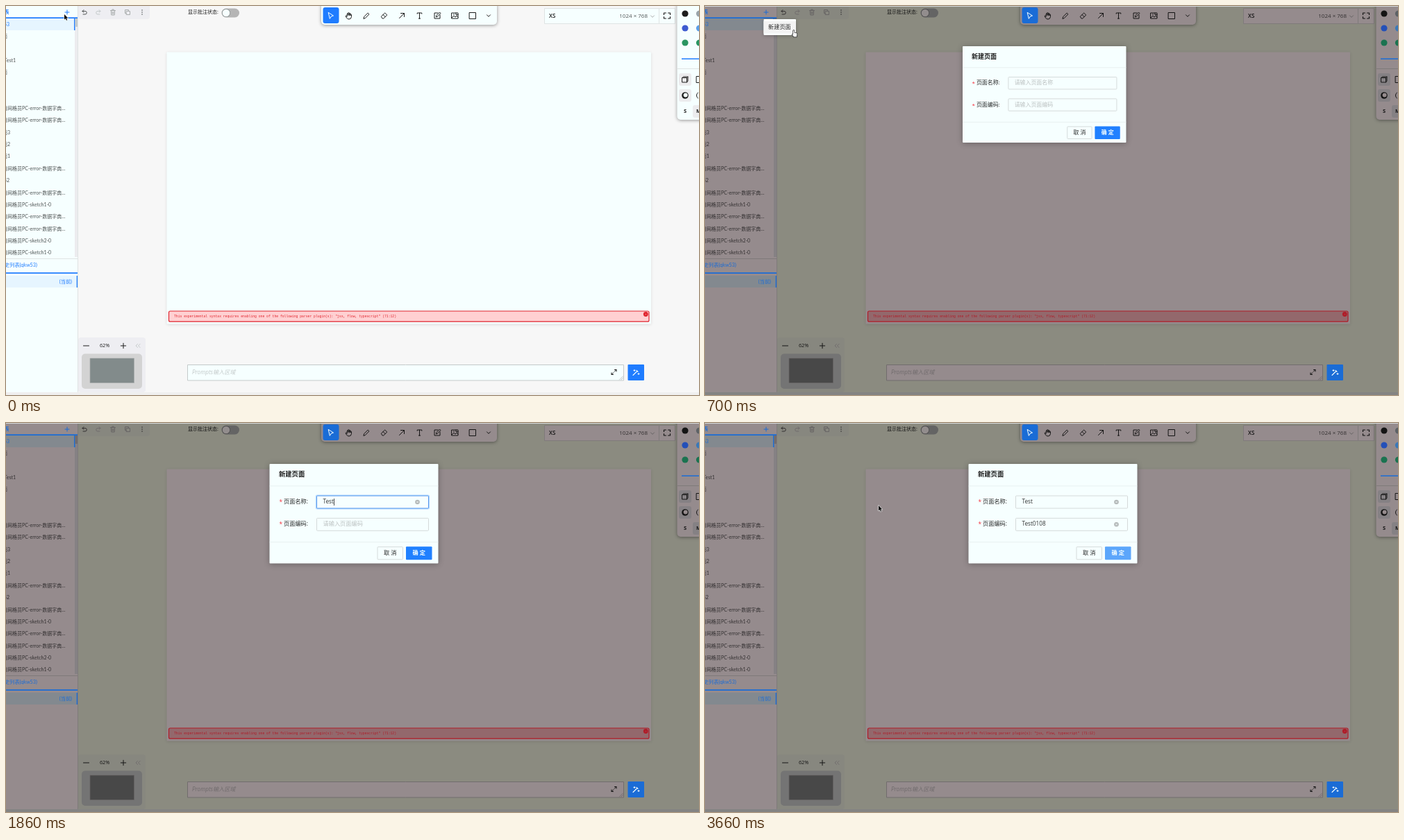
An HTML page with a canvas for the animation above (3680 ms loop, 998 by 561 pixels).

```html
<!DOCTYPE html>
<html lang="zh">
<head>
<meta charset="utf-8">
<style>
  html, body { margin: 0; width: 100%; height: 100%; overflow: hidden; }
  canvas { display: block; width: 998px; height: 561px; }
</style>
</head>
<body>
<canvas id="stage" width="998" height="561"></canvas>
<script>
const ctx = document.getElementById('stage').getContext('2d');
const LOOP = 3680, STEP = 20;
const SANS = '"Open Sans", "Noto Sans CJK SC", "Noto Sans CJK", sans-serif';
const LIST = 'Lato, "Noto Sans CJK SC", "Noto Sans CJK", sans-serif';
const MONO = '"Liberation Mono", monospace';

// Each colour: open page, mask fading in, full mask
const COLORS = {
  panel: ['#f6ffff', '#dcdcdc', '#958b8d'],
  bg: ['#f7f7f7', '#d6d6d6', '#8b8b80'],
  bar: ['#eeeef2', '#cdcdd1', '#87877f'],
  chip: ['#ececee', '#cbcbcd', '#858184'],
  edge: ['#dfe3e3', '#c2c2c2', '#7f7a7a'],
  blue: ['#1f7cff', '#1f66cc', '#1a6cd6'],
  row: ['#e6f5ff', '#c9d5de', '#83898f'],
  ink: ['#1c1c1c', '#1a1a1a', '#141414'],
  text: ['#505454', '#454545', '#333031'],
  muted: ['#a9adad', '#979797', '#676464'],
  faint: ['#c4caca', '#adadad', '#716c6d'],
  track: ['#b5b5b5', '#9c9c9c', '#646464'],
  knob: ['#f6ffff', '#dcdcdc', '#928d8d'],
  map: ['#d3d3d3', '#b4b4b8', '#747474'],
  view: ['#828b8b', '#707070', '#484848'],
  alert: ['#ffd0d2', '#d9b1b1', '#93686c'],
  red: ['#e0252f', '#cc2730', '#b01c28'],
  indigo: ['#3d5bd0', '#2a50c8', '#2450b8'],
  sky: ['#5b9fe8', '#4a8cd0', '#3a78b8'],
  green: ['#2a9662', '#2e7d55', '#1a7350'],
  gray: ['#9aa5ab', '#858e92', '#5c6266'],
  foot: ['#efefef', '#d4dcdc', '#838383']
};
let c = {};

function box(x, y, r, b, fill, stroke, radius = 0, width = 1) {
  ctx.beginPath();
  ctx.roundRect(x, y, r - x, b - y, radius);
  if (fill) { ctx.fillStyle = fill; ctx.fill(); }
  if (stroke) { ctx.strokeStyle = stroke; ctx.lineWidth = width; ctx.stroke(); }
}

function shadowBox(x, y, r, b, fill, radius, blur, alpha) {
  ctx.save();
  ctx.shadowColor = `rgba(0,0,0,${alpha})`;
  ctx.shadowBlur = blur;
  ctx.shadowOffsetY = 1;
  box(x, y, r, b, fill, null, radius);
  ctx.restore();
}

function dot(x, y, r, fill) {
  ctx.beginPath();
  ctx.arc(x, y, r, 0, 7);
  ctx.fillStyle = fill;
  ctx.fill();
}

function text(s, x, y, size, color, { font = SANS, style = '', align = 'left' } = {}) {
  ctx.font = `${style} ${size}px ${font}`;
  ctx.textAlign = align;
  ctx.textBaseline = 'middle';
  ctx.fillStyle = color;
  ctx.fillText(s, x, y);
}

function icon(d, x, y, stroke, fill, width = 1) {
  const path = new Path2D(d);
  ctx.save();
  ctx.translate(x, y);
  ctx.lineJoin = ctx.lineCap = 'round';
  if (stroke) { ctx.strokeStyle = stroke; ctx.lineWidth = width; ctx.stroke(path); }
  if (fill) { ctx.fillStyle = fill; ctx.fill(path); }
  ctx.restore();
}

const PLUS = 'M-3 0H3M0-3V3';
const SQUARE = 'M-4.5-4.5H4.5V4.5H-4.5Z';
const CHEVRON = 'M-2.5-1.2L0 1.3L2.5-1.2';
const UNDO = 'M-1-3.5L-3-1.5L-1 .5M-3-1.5H1A2.2 2.2 0 0 1 1 3H-2';
const REDO = 'M1-3.5L3-1.5L1 .5M3-1.5H-1A2.2 2.2 0 0 0-1 3H2';
const TRASH = 'M-3.5-2.5H3.5M-1.2-2.5V-4H1.2V-2.5M-2.6-2.5L-2.2 4H2.2L2.6-2.5M-.8-.5V2.3M.8-.5V2.3';
const COPY = 'M-1.5-1.5H3.5V3.5H-1.5ZM-1.5 1.5H-3.5V-3.5H1.5V-1.5';
const POINTER = 'M-3-4.5L4 0L.8 1L-1 4Z';
const PALM = 'M-2.5 1V-2.5Q-1.7-4-1-2.5V-.5V-4Q0-5 .7-4V-.5V-3.5Q1.6-4.5 2.3-3V0V-2Q3.5-3 4 -1.5V1.5Q3.5 5 .5 5Q-2 5-3 3L-4.5 .6Q-4-.8-2.5 1';
const PENCIL = 'M-4 4L-3.3 1.5L2.2-4L4-2.2L-1.5 3.3Z';
const ERASER = 'M-4 1L1.2-4L4.3-1L-.8 4H-2ZM-1.5-1.5L1.7 1.7';
const ARROW = 'M-3.5 3.5L3.5-3.5M-1.5-3.5H3.5V1.5';
const LETTER = 'M-3.3-2.8V-4H3.3V-2.8M0-4V4M-1.2 4H1.2';
const EDIT = 'M1-4H-4V4H4V-1M-1.5 1.5L-1-.5L3.5-5L5-3.5L.5 1Z';
const IMAGE = 'M-4.5-4H4.5V4H-4.5ZM-4.5 3L-1.5 0L.5 2L2.5 0L4.5 2M-2-2H-1M1.5-4V-1.5H4.5';
const CORNERS = 'M-4.5-1.5V-4H-1.5M1.5-4H4.5V-1.5M4.5 1.5V4H1.5M-1.5 4H-4.5V1.5';
const EXPAND = 'M.8-.8L3.5-3.5M1-3.5H3.5V-1M-.8 .8L-3.5 3.5M-3.5 1V3.5H-1';
const WAND = 'M-4 4L2-2M1-3L3-1M-2-4V-2M-3-3H-1M4 1V3M3 2H5';

function drawSidebar() {
  box(0, 0, 103, 557, c.panel);
  box(99, 18, 103, 362, c.chip);
  box(0, 18, 98, 35, c.row);
  box(98, 18, 99.5, 35, c.blue);
  box(99.5, 18, 103, 30, c.faint);
  box(0, 16.3, 103, 18, c.blue);
  text('表', 4.5, 9, 7.2, c.blue, { font: LIST, align: 'right', style: 'bold' });
  icon(PLUS, 88, 9, c.blue);

  const error = '目网格员PC-error-数据字典…', sketch = '目网格员PC-sketch';
  const rows = ['qkw53', '面', '', 'Test1', '面', '', '', error, error, '面3', '面2', '面1',
    error, 'qkw52', error, sketch + '1-0', error, error, sketch + '2-0', sketch + '1-0'];
  rows.forEach((label, i) => {
    const y = 26.5 + 17.35 * i;
    if (label.startsWith('qkw')) text(label, 5, y, 7, i ? c.text : c.blue, { font: LIST, align: 'right' });
    else if (label === 'Test1') text(label, 14, y, 7, c.text, { font: LIST, align: 'right' });
    else text(label, -4.9, y, 7, c.text, { font: LIST });
  });

  box(0, 362, 103, 389, c.panel);
  box(0, 364, 103, 365, c.edge);
  text('史列表(qkw53)', -2, 374, 7.2, c.blue, { font: LIST });
  box(0, 384.2, 103, 386, c.blue);
  box(0, 389, 103, 406, c.row);
  box(101.7, 389, 103, 406, c.blue);
  text('(当前)', 95, 398, 7.2, c.blue, { font: LIST, align: 'right' });
  box(103, 0, 104, 557, c.edge);
}

function drawToolbars() {
  box(104, -5, 207, 19, c.bar, null, 4);
  icon(UNDO, 113, 9, c.text);
  icon(REDO, 133, 9, c.faint);
  icon(TRASH, 154, 9, c.muted);
  icon(COPY, 175, 9, c.muted);
  for (const y of [6, 9, 12]) dot(196, y, 0.8, c.text);
  text('显示批注状态:', 262, 9.5, 7, c.ink);
  box(310.5, 3.5, 336, 16.5, c.track, null, 6.5);
  dot(317, 10, 6, c.view);
  dot(317, 10, 5.3, c.knob);

  shadowBox(454, -5, 707, 27, c.panel, 5, 5, 0.4);
  box(456.5, 2, 479.5, 25, c.blue, null, 3);
  icon(POINTER, 467.5, 14, '#f6ffff');
  [PALM, PENCIL, ERASER, ARROW, LETTER, EDIT, IMAGE, SQUARE, CHEVRON].forEach((d, i) =>
    icon(d, i < 8 ? 493.5 + 25.5 * i : 695, 14, c.ink));

  box(775.5, 3.5, 940.5, 25.5, c.panel, c.edge);
  text('XS', 782, 15, 8, c.ink, { style: '600' });
  text('1024 × 768', 924, 15, 8, c.text, { align: 'right' });
  icon(CHEVRON, 931, 15, c.muted);
  box(940.5, 3.5, 963.5, 25.5, c.panel, c.edge);
  icon(CORNERS, 952, 14, c.ink, null, 1.2);
}

function drawStylePanel() {
  shadowBox(966.5, -6, 1010, 164, c.panel, 5, 5, 0.4);
  [[c.ink, c.gray], [c.indigo, c.sky], [c.green, c.green]].forEach(([left, right], i) => {
    dot(978, 11 + 21 * i, 4.6, left);
    dot(998.5, 11 + 21 * i, 4.6, right);
  });
  box(973, 75.5, 998, 77, c.blue);
  box(967, 90, 998, 91, c.edge);
  box(969, 97, 987, 115, c.chip, null, 3);
  icon('M-4-2.5H2.5V4H-4ZM-4-2.5L-2.5-4H4V2.5L2.5 4M2.5-2.5L4-4', 978, 106, c.ink);
  icon(SQUARE, 999, 106, c.ink);
  box(969, 120, 987, 138, c.chip, null, 3);
  dot(978, 129, 4.8, c.ink);
  dot(978.6, 128.4, 3, c.panel);
  icon('M-2.5-4Q-4.5-3-4.5 0Q-4.5 3-2.5 4', 999, 129, c.ink);
  text('S', 978, 152, 7.5, c.ink, { style: 'bold', align: 'center' });
  box(989, 143, 1007, 161, c.chip, null, 3);
  text('M', 994, 152, 7.5, c.ink, { style: 'bold' });
}

function drawWorkspace() {
  shadowBox(231.5, 66.5, 929, 458.5, c.panel, 1, 4, 0.12);
  box(234.5, 440, 926, 455.2, c.alert, c.red, 2, 1.2);
  text('This experimental syntax requires enabling one of the following parser plugin(s): ' +
    '"jsx, flow, typescript" (71:12)', 242, 447.5, 4.73, c.red, { font: MONO });
  dot(921.3, 444.5, 3.4, c.red);
  text('×', 921.3, 444.5, 4, c.alert, { align: 'center' });

  box(104, 478, 201, 557, c.bar, null, 4);
  icon('M-4 0H4', 115.5, 490, c.ink);
  text('62%', 142, 490, 7.2, c.ink, { align: 'center' });
  icon('M-3.7 0H3.7M0-3.7V3.7', 169, 490, c.ink);
  icon('M-.5-2.5L-3 0L-.5 2.5M3-2.5L.5 0L3 2.5', 190, 490, c.faint);
  box(109, 501.5, 196, 552, c.map, null, 5);
  box(121, 508, 184.5, 543.5, c.view, c.muted, 0, 0.7);

  box(261.5, 517.5, 889.5, 540, c.panel, c.faint);
  text('Prompts输入区域', 268, 528.5, 8.1, c.faint, { style: 'italic' });
  icon(EXPAND, 875.5, 528, c.ink);
  icon('M-2.5 2.5L2.5-2.5M0 2.5L2.5 0', 886, 536.5, c.muted, null, 0.7);
  box(895.5, 517, 919, 540, c.blue, null, 1);
  icon(WAND, 907, 528.5, '#f6ffff', null, 1.1);
  box(0, 557, 998, 561, c.foot);
}

function drawPopup(t, hovered) {
  const alpha = Math.min((t - 260) / 60, (840 - t) / 100, 1);
  if (alpha <= 0) return;
  ctx.save();
  ctx.globalAlpha = alpha;
  shadowBox(84.5, 19, 131, 42, '#fbffff', 1, 5, 0.25);
  if (hovered) box(84.5, 22, 131, 39.5, '#f3f3f3');
  text('新建页面', 91, 31, 8.2, '#2a2a2a');
  ctx.restore();
}

function drawField(label, hint, y, value, focused, hovered) {
  text('*', 393.5, y + 1, 8.2, '#f5333f');
  text(label + ':', 400, y, 8.2, '#2a2a2a');
  if (focused) box(446.5, y - 9.8, 609.3, y + 9.8, null, '#b9dcff', 1.5, 1.6);
  box(447.5, y - 9, 608.5, y + 9, '#f6ffff', focused || hovered ? '#5596ec' : '#d5dada', 1);
  text(value || hint, 456.5, y, 8.2, value ? '#333' : '#bcc1c1');
  if (value) {
    dot(592.5, y, 3.3, '#b3b8b8');
    icon('M-1-1L1 1M1-1L-1 1', 592.5, y, '#f6ffff', null, 0.8);
  }
  if (focused) {
    const end = 456.8 + (value ? ctx.measureText(value).width : 0);
    box(end, y - 5, end + 0.8, y + 5, '#222');
  }
}

function typed(word, times, t) {
  return word.slice(0, times.filter(at => t >= at).length);
}

function drawDialog(t) {
  if (t < 680) return;
  const scale = t < 760 ? 1 - 0.148 * Math.exp((680 - t) / 12.8) : 1;
  ctx.save();
  ctx.globalAlpha = t < 700 ? 0.96 : 1;
  ctx.translate(106, 26);
  ctx.scale(scale, scale);
  ctx.translate(-106, -26);
  shadowBox(379.5, 59, 622.5, 202.5, t < 700 ? '#fbfbfb' : '#f6ffff', 1, 8, 0.3);
  text('新建页面', 393, 75, 9.3, '#1c1c1c', { style: '600' });
  box(379.5, 90.5, 622.5, 91.2, '#e4ecec');
  const name = typed('Test', [1340, 1480, 1620, 1780], t);
  const code = typed('Test0108', [2400, 2480, 2560, 2660, 2900, 3040, 3160, 3300], t);
  drawField('页面名称', '请输入页面名称', 114, name, t >= 1040 && t < 2220, t >= 980 && t < 3380);
  drawField('页面编码', '请输入页面编码', 146.3, code, t >= 2220 && t < 3500, false);
  box(379.5, 171.5, 622.5, 172.2, '#e4ecec');
  box(535, 178.7, 571.5, 196.8, '#f6ffff', '#d5dada', 1);
  text('取 消', 553.3, 187.8, 8.2, '#2a2a2a', { align: 'center' });
  box(576, 178.2, 613.5, 197.2, t >= 3460 ? '#5ca6fb' : '#2080ff', null, 1);
  text('确 定', 594.8, 187.8, 8.2, '#f6ffff', { align: 'center', style: '600' });
  ctx.restore();
}

const MOUSE = [[0, 84, 12], [200, 84, 12], [300, 88, 10], [400, 90, 15], [560, 106, 27], [640, 106, 28],
  [660, 114, 28], [680, 119, 33], [720, 131, 36], [980, 500, 112], [1300, 502, 115],
  [3340, 502, 115], [3470, 592, 188], [3540, 592, 188], [3660, 250, 119], [3680, 240, 118]];

function mouseAt(t) {
  const i = MOUSE.findIndex(k => k[0] > t);
  const [t0, x0, y0] = MOUSE[i - 1], [t1, x1, y1] = MOUSE[i];
  const p = (t - t0) / (t1 - t0);
  return [x0 + (x1 - x0) * p, y0 + (y1 - y0) * p];
}

function drawMouse(t, x, y, overPopup) {
  if (t >= 1300 && t < 3360) return;
  const inside = (l, top, r, b) => x > l && x < r && y > top && y < b;
  const open = t >= 740;
  if (overPopup || (!open && inside(85, 3, 95, 15)) || (open && inside(576, 178, 614, 197)))
    icon('M2 4V1Q2.7-.2 3.5 1V4L6.5 4.6Q7.7 5 7.5 6.5L6.8 10H3L.5 6.8Q.6 5.6 2 6.5Z', x, y, '#222', '#f4f4f4', 1.3);
  else if (open && (inside(447, 105, 609, 123) || inside(447, 137, 609, 155)))
    icon('M-1.5-4.5Q0-4.5 0-3.5Q0-4.5 1.5-4.5M0-3.5V3.5M-1.5 4.5Q0 4.5 0 3.5Q0 4.5 1.5 4.5', x, y, '#222', null, 0.8);
  else
    icon('M0 0V7.5L1.8 6L3 8.8L4.2 8.2L3 5.6H5.3Z', x, y, '#f4f4f4', '#0a0a0a', 1.2);
}

function render(t) {
  const phase = t < 680 ? 0 : t < 700 ? 1 : 2;
  for (const key in COLORS) c[key] = COLORS[key][phase];
  const [x, y] = mouseAt(t);
  const overPopup = t >= 280 && t < 720 && x > 84 && x < 131 && y > 19 && y < 42;
  box(0, 0, 998, 561, c.bg);
  drawWorkspace();
  drawSidebar();
  drawToolbars();
  drawStylePanel();
  if (phase === 2) box(0, 0, 998, 1, '#d4d8d8');
  drawPopup(t, overPopup);
  drawDialog(t);
  drawMouse(t, x, y, overPopup);
}

const start = performance.now();
function tick() {
  const t = (performance.now() - start) % LOOP;
  render(Math.floor(t / STEP) * STEP);
  requestAnimationFrame(tick);
}
tick();
</script>
</body>
</html>
```
